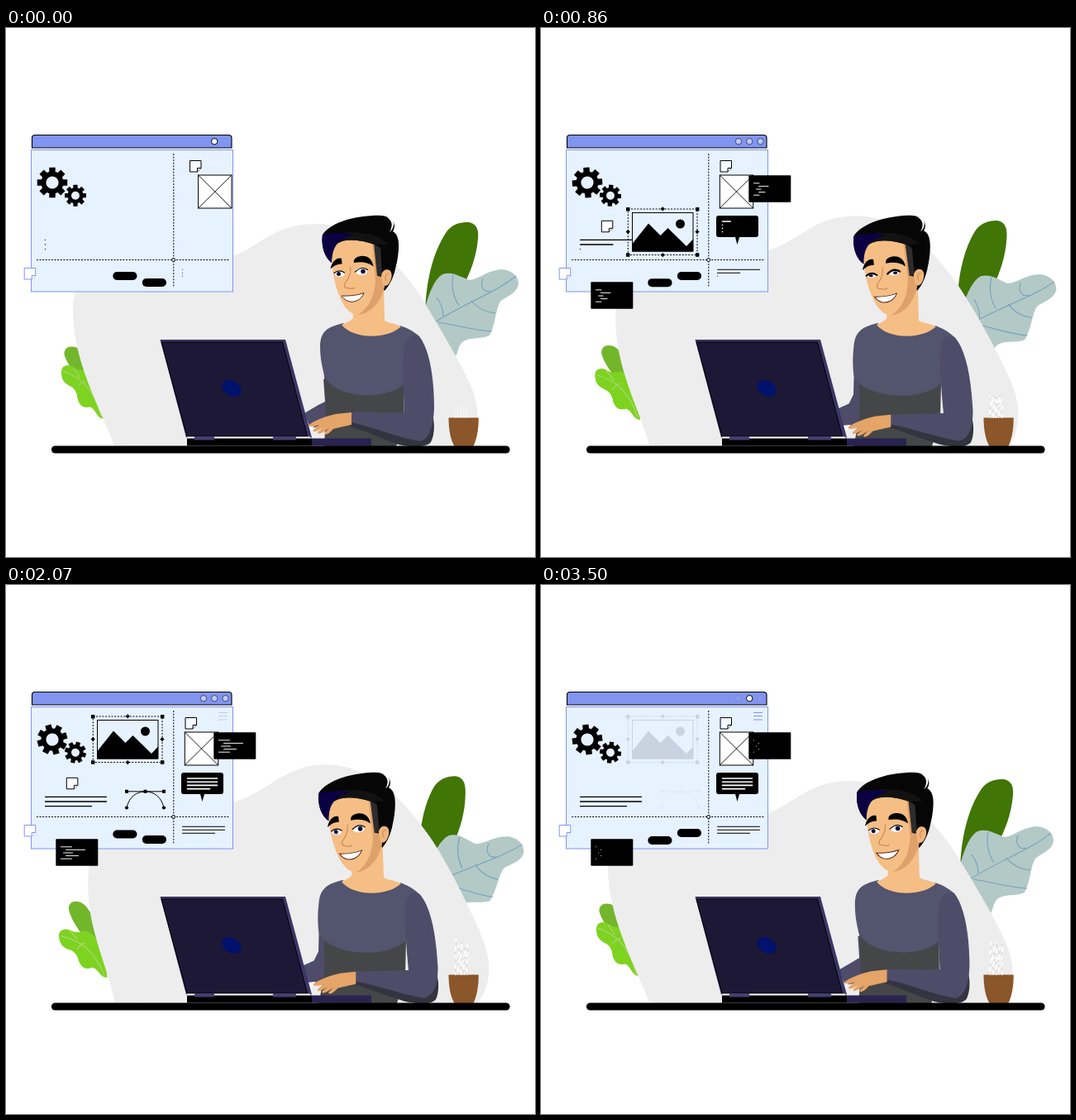
Write an HTML page that moves like this. It is 640 px wide and 640 px high and loops after 3.57 s.

```html
<!DOCTYPE html>
<html lang="en">
<head>
<meta charset="utf-8">
<title>Designer at work</title>
<style>
html, body { margin: 0; width: 100%; height: 100%; overflow: hidden; background: #fff; }
svg { display: block; width: 100vw; height: 100vh; }
.ln { fill: none; stroke: #000; }
.round { stroke-linecap: round; }
.vein { fill: none; stroke: #76a0bb; stroke-width: 1.1; }
</style>
</head>
<body>
<svg viewBox="0 0 640 640">
  <defs>
    <clipPath id="steamClip"><rect id="steamBox" x="536" y="420" width="32" height="52"/></clipPath>
    <g id="note">
      <path d="M0 0H13.5V9L9 13.5H0Z"/>
      <path d="M13.5 9H9V13.5"/>
    </g>
  </defs>

  <g id="leafDark"><path fill="#417505" d="M507 345C508 305 517 271 532 248C540 236 553 234 562 235.5C570 238 572 245 571 255C569 278 561 298 552 314L520 350Z"/></g>
  <g id="leafPale">
    <path fill="#b3c9c6" d="M505 345C512 320 518 304 528 298C540 294 549 301 561 305C574 303 582 293 600 292C613 293 620 301 620 309C619 321 606 324 598 331C592 340 593 357 585 372C575 377 559 373 551 381C546 387 547 397 540 402Z"/>
    <path class="vein" d="M510 362C545 337 590 322 617 300M541 299C538 314 541 325 548 336M577 303C573 312 578 321 587 318M521 326C527 334 529 340 529 349M523 356C548 360 568 366 588 367M563 330C571 340 581 344 592 345"/>
  </g>
  <g id="sproutMid"><path fill="#73b62c" d="M70.500 395C70 387 76 384 84 386C98 391 110 416 112 450C95 430 75 412 70.500 395Z"/></g>
  <g id="sproutLight">
    <path fill="#7ed321" d="M67 418C66 409 73 406 80 409C86 413 90 415 97 413C112 413 121 445 118 473C109 472 109 461 102 458.500C94 460 90 458 87 450C86 443 85 438 79 434C72 431 67 426 67 418Z"/>
    <path fill="none" stroke="#b4d58a" d="M69 415C90 423 106 435 115 470M97 428C93 427 90 430 87 434M81 411C85 416 87 418 89 423"/>
  </g>
  <path id="blob" fill="#ededed"/>

  <g id="window">
    <path d="M31.5 145V133Q31.5 129.5 35 129.5H269Q273 129.5 273 133V145Z" fill="#8094f0" stroke="#000" stroke-width="1.1"/>
    <g fill="#fff" stroke="#000">
      <circle class="outer" cx="239" cy="137.2" r="3.7"/>
      <circle id="middle" cx="252.2" cy="137.2" r="3.7"/>
      <circle class="outer" cx="265.5" cy="137.2" r="3.7"/>
    </g>
    <rect x="30.5" y="147.5" width="244" height="171.5" fill="#e6f2ff" stroke="#8094f0"/>
    <path id="menu" d="M257 154.5H268M257 158.5H268M257 163H268" stroke="#8094f0"/>
    <path class="ln" stroke-dasharray="2 1.6" d="M202.8 152V314M37 280.5H270"/>
    <circle cx="202.6" cy="280.5" r="2" fill="#e6f2ff" stroke="#000"/>
    <path id="gearBig" fill-rule="evenodd"/>
    <path id="gearSmall" fill-rule="evenodd"/>
    <use href="#note" x="22.2" y="290.5" fill="#fff" stroke="#8094f0"/>
    <g id="noteTop" fill="#f4f9ff" stroke="#000"><use href="#note" x="217" y="160.5"/></g>
    <g id="cross" fill="#fff" stroke="#000"><rect x="216.3" y="178" width="40.4" height="40"/><path d="M216.3 178L256.7 218M256.7 178L216.3 218" stroke-width=".9"/></g>
    <g id="textLeft" class="ln round" stroke-width="1.3"></g>
    <g id="textRight" class="ln round" stroke-width="1"></g>
    <g id="noteMid" fill="#fff" stroke="#000"><use href="#note" x="-14" y="-13.7"/></g>
    <g id="picture">
      <rect x="105.3" y="219" width="83.7" height="55.5" class="ln" stroke-dasharray="2 1.7"/>
      <rect x="110.5" y="223.5" width="73.5" height="46.5" fill="#e6f2ff" stroke="#000"/>
      <path d="M110.5 261L130 236.5L144.5 251L153.5 242L176 264L184 255.5V270.5H110.5Z"/>
      <circle cx="168.5" cy="237" r="5.5"/>
      <path d="M103 217h4.4v4.4h-4.4zM187 217h4.4v4.4H187zM103 272.3h4.4v4.4h-4.4zM187 272.3h4.4v4.4H187zM147.2 216.2l2.6 2.6-2.6 2.6-2.6-2.6zM147.2 272l2.6 2.6-2.6 2.6-2.6-2.6zM105.2 244l2.6 2.6-2.6 2.6-2.6-2.6zM189 244l2.6 2.6-2.6 2.6-2.6-2.6z"/>
    </g>
    <g id="curve">
      <path class="ln" d="M146 249.8H191M146 269.5C149 256 158 250 168.5 250S188 256 191 269.5"/>
      <path d="M144 247.8h4v4h-4zM166.5 247.8h4v4h-4zM189 247.8h4v4h-4z"/>
      <circle cx="146" cy="269.5" r="2.1"/><circle cx="191" cy="269.5" r="2.1"/>
    </g>
    <rect id="pillA" x="129.3" width="29.2" height="10" rx="5"/>
    <rect id="pillB" x="164.8" width="29.2" height="10" rx="5"/>
    <g id="bubble">
      <path d="M-22.5 -35H22.5Q25.5 -35 25.5 -32V-12Q25.5 -9 22.5 -9H2.5L0 0L-2.5 -9H-22.5Q-25.5 -9 -25.5 -12V-32Q-25.5 -35 -22.5 -35Z"/>
    </g>
    <g id="bubbleText" fill="none" stroke="#fff" stroke-width="1.6" class="round"></g>
    <rect class="panel" width="51" height="32.5" y="-32.5" rx="1"/>
    <rect class="panel" width="51" height="32.5" y="-32.5" rx="1"/>
    <g id="code" fill="none" stroke="#fff" stroke-width=".95" class="round"></g>
  </g>

  <g id="man">
    <path id="backArm" fill="#4e4c69"/>
    <path id="lower" fill="#454648"/>
    <path id="chest" fill="#53546d"/>
    <path id="armShade" fill="#33343f"/>
    <path id="arm" fill="#4e4c69"/>
    <path id="neck" fill="#f5be85"/>
    <g id="head">
      <path fill="#060606" d="M440 250L470 255C476 270 474 300 458 318L446 300Z"/>
      <path fill="#f5be85" d="M394 268C393 290 398 318 409 336C415 344 420 347 427 347C442 346 456 328 458 311L456 296L453 258L402 254Z"/>
      <path fill="#dfa16a" d="M443 260L455 262L458 311C456 328 442 346 426 347C440 338 446 323 447 305Z"/>
      <path fill="#060606" d="M394 284C385 277 381 264 383 250C390 239 410 230 437 227.500C452 226 461 227 465 231C471 235 471 241 468 246C476 250 476 263 474 277C473 285 471 290 468 294C463 289 457 292 455 301L450 300L446 262C430 256 412 254 402 260C395 264 394 274 394 284Z"/>
      <path fill="#121212" d="M402 249C420 245 450 247 462 262L446 262C430 256 412 254 402 260Z"/>
      <path fill="#2c2c2c" d="M445 261L453 266L455 299L449 300Z"/>
      <path fill="#0b0042" d="M383 250C395 247 410 247 421 250C405 255 395 260 394 284C386 278 381 264 383 250Z"/>
      <path fill="#fff" d="M459 228C467 232 469 238 464 247C470 242 471 234 465 230Z"/>
      <path fill="#f0b57c" d="M454 300C455 293 460 291 464 293C468 296 467 303 464 308C462 312 458 313 456 311Z"/>
      <path fill="none" stroke="#c88a55" d="M463 297C459 297 458 302 460 306"/>
      <path d="M392.500 291.500C394 283 400 277 406 279L406.500 285.500C402 285 397 287 392.500 291.500ZM421 284C420 280 423 277 429 276C437 275 443 279 444.500 288.500C438 283.500 430 282.500 421 284Z"/>
      <g class="eye"><ellipse cx="403.500" cy="297.300" rx="6" ry="3.800" fill="#fff"/><circle cx="402.500" cy="297.500" r="2.500" fill="#08083a"/></g>
      <g class="eye"><ellipse cx="430" cy="294.500" rx="7.200" ry="4.300" fill="#fff"/><circle cx="432" cy="294.500" r="2.800" fill="#08083a"/></g>
      <path class="ln round" id="lashes" d="M397 296.500Q403 291.500 409.500 296M422.500 295Q430 287.500 437.500 292.500"/>
      <path fill="none" stroke="#c98a50" stroke-width="1.1" d="M416.500 289C418 295 416 301 410 309C408 313 411 315 414 314.500C417 316 419 316 422 314"/>
      <path fill="#fff" stroke="#5b2a18" d="M406 324C415 324.500 425 323.500 433 320.500C430 329 421 333 414 330.500C410 329 408 327 406 324Z"/>
    </g>
  </g>

  <g id="laptop">
    <path id="gap" fill="#fff"/>
    <path fill="#3c3566" d="M186.500 377H338L370 495.500H218Z"/>
    <path fill="#1e1837" stroke="#000" d="M188 380H334.500L364.500 494H219Z"/>
    <path fill="#fff" d="M219 494.600H368V496.400H219Z"/>
    <ellipse cx="273" cy="436" rx="12.500" ry="9" transform="rotate(30 273 436)" fill="#00126c"/>
    <path d="M219 496.400H370V505.500H219Z"/>
    <path fill="#2a2350" d="M370 496.500H442V505.500H370Z"/>
    <path fill="#443f70" d="M228 494H252V498.500H228ZM323 494H351V498.500H323Z"/>
  </g>
  <path id="hand" fill="#e5a468" d="M418 465L399 467C386 470 373 475 366.500 480C365 483 372 483 379 480L372 486C370 490 376 489 384 483L377 489C377 493 383 490 391 484L385 490C385 494 391 491 396 485C403 483 410 482 418 480Z"/>

  <path fill="#8a562a" d="M535.500 471.500H571.700C572 487 569 498 565.500 506H542.500C538 498 535.500 487 535.500 471.500Z"/>
  <g id="steam" clip-path="url(#steamClip)" fill="none"></g>
  <path d="M59.500 510H605" stroke="#000" stroke-width="9.200" class="round"/>
</svg>
<script>
const LOOP = 3570, FRAMES = 50;
const $ = id => document.getElementById(id);
const all = q => [...document.querySelectorAll(q)];
const set = (el, name, v) => el.setAttribute(name, v);
const clamp = p => Math.max(0, Math.min(1, p));
const smooth = p => p * p * (3 - 2 * p);
const add = (parent, attrs) => {
  const el = document.createElementNS("http://www.w3.org/2000/svg", "path");
  for (const name in attrs) set(el, name, attrs[name]);
  return parent.appendChild(el);
};

// Value at k along [k, value] steps
function at(k, steps, ease = p => p) {
  let [k0, v0] = steps[0];
  if (k <= k0) return v0;
  for (const [k1, v1] of steps) {
    if (k < k1) return v0 + (v1 - v0) * ease((k - k0) / (k1 - k0));
    [k0, v0] = [k1, v1];
  }
  return v0;
}

// Blend two paths of equal structure
function mix(a, b, p) {
  const num = /-?[\d.]+/g, to = b.match(num);
  let i = 0;
  return a.replace(num, v => (+v + (to[i++] - v) * p).toFixed(2));
}

function gear(outer, inner, hole) {
  const pts = [], tooth = Math.PI / 4;
  for (let i = 0; i < 8; i++)
    for (const [r, da] of [[inner, -.28], [outer, -.2], [outer, .2], [inner, .28]]) {
      const a = i * tooth + da;
      pts.push((r * Math.cos(a)).toFixed(2) + " " + (r * Math.sin(a)).toFixed(2));
    }
  return `M${pts.join("L")}ZM${hole} 0A${hole} ${hole} 0 1 0 ${-hole} 0A${hole} ${hole} 0 1 0 ${hole} 0Z`;
}
set($("gearBig"), "d", gear(18.6, 13.6, 7.6));
set($("gearSmall"), "d", gear(13.2, 9.6, 5));

const morphs = {
  backArm: ["M384 425L386 452L378 456L361 466L368 484L390 480L390 425Z",
            "M373 420L370 435L367 453L353 457L364 482L388 478L390 425Z"],
  lower: ["M385 420L481 430L482 480L472 506H385L387 470Z", "M385 425L487 430L484 468L474 506H372L384 465Z"],
  chest: ["M408 357C388 362 381 367 380 384C380 402 383 410 385 421C397 447 456 453 481 431L500 373C492 366 485 363 477 360C462 375 420 375 408 357Z",
          "M407 357C389 361 380 367 377 384C373 402 372 412 372 423C388 448 460 454 486 430L500 375C492 367 485 363 477 360C460 375 420 375 407 357Z"],
  armShade: ["M417 476L480 470L515 465C519 475 519 492 514 501C508 508 490 507 475 504C452 496 434 487 416 482Z",
             "M428 480L490 474L524 468C529 476 530 494 526 502C519 509 503 507 488 503C466 497 446 490 428 485Z"],
  arm: ["M417 465C440 464 460 466 482 465C481 440 479 410 481 390C483 376 490 369 500 373C513 390 518 425 518 460C517 485 511 498 501 500C474 496 445 482 416 477Z",
        "M428 470C450 470 470 468 492 467C488 440 485 410 485 390C486 376 492 369 501 375C518 392 523 430 527 466C528 488 522 497 510 499C484 496 456 486 428 482Z"],
  neck: ["M420 338L420 350C419 354 412 356 406 359C420 377 462 377 478 361C470 357 462 357 458 354L457 310Z",
         "M417 338L417 350C416 354 411 356 406 359C420 377 462 377 478 361C470 357 460 357 456 354L454 310Z"],
  gap: ["M364 482L373 481L369 487Z", "M363 480L377 479L369 488Z"]
};
const blobPaths = [
  "M131 505C112 455 79 400 81 335C83 300 120 285 200 290C245 290 265 283 275 276C310 262 325 237 375 237C430 237 475 285 500 322C520 355 545 395 562 432C575 462 573 490 560 512Z",
  "M132 505C122 455 96 410 101 350C104 300 140 270 200 272C245 270 262 267 275 262C320 249 338 216 388 216C440 216 478 257 502 288C527 318 555 375 575 421C592 460 587 490 566 512Z"
];

// Lines that draw themselves from the left
const lines = [];
const line = (parent, x, y, w, grow) => lines.push({ el: add($(parent), {}), x, y, w, grow });
const after = (start, dur) => k => clamp((k - start) / dur);
[74, 74, 56].forEach((w, i) => line("textLeft", 47.5, 256.3 + i * 5.7, w, after(i * 8, 7.5)));
[51, 51, 39].forEach((w, i) => line("textRight", 213.5, 292.3 + i * 4, w, after(i * 8, 7.5)));
[36, 36, 36, 27].forEach((w, i) => line("bubbleText", 219.5, 234 + i * 4.2, w, after(11 + i * 3.7, 3.7)));
const codeGrow = k => at(k, [[4, 0], [20, 1], [36, 1], [49, 0]]);
for (const [px, py] of [[251.5, 179], [60.5, 308]])
  [[6, 13], [12, 23], [9, 11], [12, 15], [6, 13]].forEach(([x, w], i) =>
    line("code", px + x, py + 8.8 + i * 3.6, w, codeGrow));

const strands = [544, 547.5, 551, 554.5, 558].map((x, i) => {
  const top = 428 + (i * 7) % 11;
  const d = `M${x} 472C${x - 3} 458 ${x + 3} 450 ${x} ${(472 + top) / 2}S${x + 2} ${top + 8} ${x} ${top}`;
  add($("steam"), { d, stroke: "#fff", "stroke-width": 1.6 });
  return add($("steam"), { d, stroke: "#c9c9c9", "stroke-width": 1, "stroke-dasharray": "4 7" });
});

const spin = (id, deg, x, y) => set($(id), "transform", `rotate(${deg} ${x} ${y})`);
const place = (el, x, y, s) => set(el, "transform", `translate(${x} ${y}) scale(${s})`);

function render(ms) {
  const k = Math.floor(((ms % LOOP) + 6) / (LOOP / FRAMES)) % FRAMES;
  const sway = (1 - Math.cos(2 * Math.PI * k / FRAMES)) / 2;
  const lean = at(k, [[0, 0], [8, 1], [16, 0], [24, 1], [34, 0], [43, 1], [50, 0]], smooth);

  set($("blob"), "d", mix(...blobPaths, sway));
  spin("leafDark", -5.7 * sway, 510, 415);
  spin("leafPale", 6.2 * sway, 484, 379);
  spin("sproutMid", 5.7 * sway, 111, 450);
  spin("sproutLight", -8.6 * sway, 134, 442);

  const turn = k * 360 / FRAMES;
  set($("gearBig"), "transform", `translate(56 187) rotate(${turn})`);
  set($("gearSmall"), "transform", `translate(84 202.7) rotate(${-turn})`);
  all(".outer").forEach(c => set(c, "opacity", lean));
  set($("middle"), "opacity", 1 - lean);
  set($("menu"), "opacity", at(k, [[15, 0], [23, .6], [26, .6], [33, .12], [43, .12], [48, 1]]));

  const slide = 1 - smooth(clamp(k / 10));
  set($("noteTop"), "transform", `translate(${5.5 * slide} 0)`);
  set($("cross"), "transform", `translate(${16.3 * slide} 0)`);
  place($("noteMid"), 87.3, 247, at(k, [[.5, 0], [4, .6], [8, 1], [41, 1], [43, .88], [48.5, 0]]));

  const rise = 60 * smooth(clamp((k - 16) / 10.5));
  set($("picture"), "transform", `translate(0 ${-rise})`);
  set($("picture"), "opacity", at(k, [[0, 0], [4, .55], [8, 1], [44, 1], [49, .12]]));
  set($("curve"), "opacity", at(k, [[16, 0], [28, 1], [38, 1], [49, .03]]));
  set($("pillA"), "y", at(k, [[4, 295], [10, 303], [24, 304], [30, 295], [41, 295], [43, 298], [46, 304]]));
  set($("pillB"), "y", at(k, [[0, 303], [4, 301], [8, 295], [20, 295], [24, 301], [28, 303], [36, 303], [42, 295]]));

  place($("bubble"), 237.5, 262, at(k, [[0, 0], [4, .53], [8, 1]]));
  set($("bubble"), "opacity", at(k, [[3, 0], [4, .15], [8, 1]]));
  set($("bubbleText"), "opacity", k < 9 ? 0 : 1);
  const grow = at(k, [[0, 0], [4, .9], [5, 1]]);
  all(".panel").forEach((p, i) => place(p, i ? 60.3 : 251.3, i ? 339.8 : 210.8, grow));
  set($("code"), "opacity", k < 3 ? 0 : 1);
  for (const l of lines) set(l.el, "d", `M${l.x} ${l.y}h${Math.max(.01, l.w * l.grow(k))}`);

  for (const id in morphs) set($(id), "d", mix(...morphs[id], lean));
  set($("head"), "transform", `translate(${-3.5 * lean} 0) rotate(${-3.4 * lean} 445 350)`);
  set($("hand"), "transform", `translate(${10.5 * lean} ${5.5 * lean})`);
  const lid = at(k, [[10, 0], [12, .45], [13, 1], [15, 0], [33, 0], [35, .6], [36, 1], [38, 0]]);
  all(".eye").forEach((e, i) => {
    const y = i ? 298 : 300;
    set(e, "transform", `translate(0 ${y}) scale(1 ${1 - .85 * lid}) translate(0 ${-y})`);
  });
  set($("lashes"), "transform", `translate(0 ${4 * lid})`);
  set($("lashes"), "stroke-width", 1.2 + 2.4 * lid);

  const steam = at(k, [[0, 15], [4, 19], [12, 28], [24, 45]]);
  set($("steamBox"), "y", 472 - steam);
  set($("steam"), "opacity", at(k, [[0, .4], [4, .8], [8, 1]]));
  strands.forEach((s, i) => {
    set(s, "stroke-dashoffset", i * 4 - k * .88);
    set(s, "opacity", at(k, [[4, 0], [12, 1]]));
  });
}

const start = performance.now();
function tick() {
  render(performance.now() - start);
  requestAnimationFrame(tick);
}
render(0);
requestAnimationFrame(tick);
</script>
</body>
</html>
```
